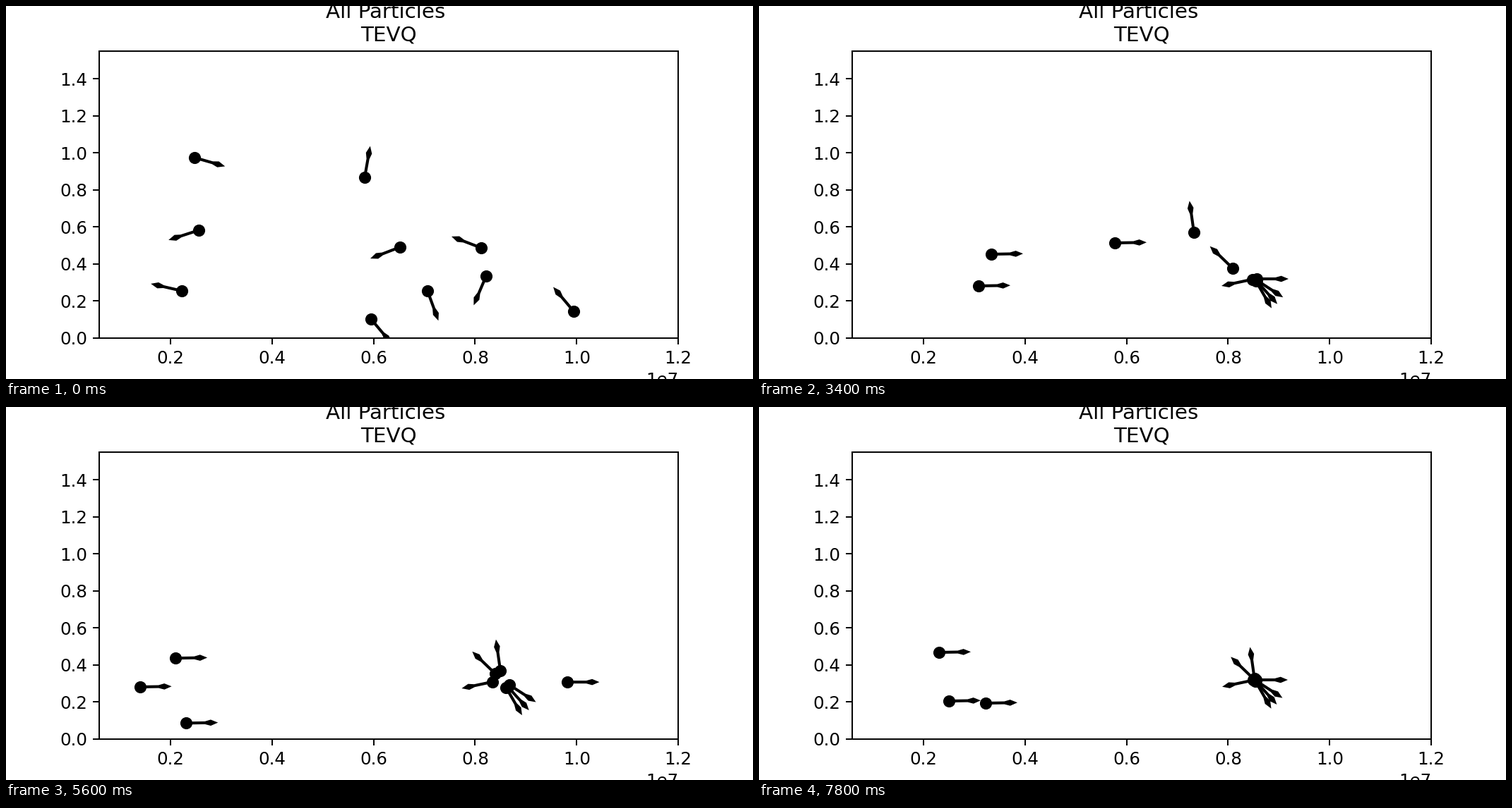
A matplotlib script for the animation above (8 s loop, 1058 by 529 pixels).

```python
import numpy as np
import matplotlib.pyplot as plt
from matplotlib.animation import FuncAnimation

WIDTH, HEIGHT = 1058, 529
STEPS, STEP_MS = 40, 200
ARROW = 45             # arrow length in pixels
HUB = (702, 387)       # where the swarm gathers
LAUNCHES = (0, 11)     # steps at which the swarm is spread out
LANDINGS = {6: 15, 17: 3, 23: 24, 32: 4, 39: 2}  # step: overshoot past the hub


def particle(first, second, heading=0, stops={}, recoil=0):
    """Motion from two launch poses (x, y, heading) to the hub or its own stops."""
    poses = dict(zip(LAUNCHES, (first, second)))
    a = np.radians(heading)
    for step, over in LANDINGS.items():
        past_hub = HUB[0] + over * np.cos(a), HUB[1] - over * np.sin(a)
        poses[step] = (*stops.get(step, past_hub), heading)
    steps = sorted(poses)
    x, y, turn = np.array([poses[s] for s in steps], float).T
    turn = np.unwrap(turn, period=360)

    def at(t):
        leg = np.interp(t, steps, range(len(steps)))
        px, py, angle = (np.interp(t, steps, v) for v in (x, y, turn))
        return px - recoil * abs(np.sin(np.pi * leg)), py, angle

    return at


def straggler(first, second, *stops):
    """A particle that never reaches the hub and swings left between stops."""
    return particle(first, second, 1, dict(zip(LANDINGS, stops)), recoil=90)


swarm = [
    straggler((267, 215, -16), (299, 221, -27),
              (339, 376), (329, 352), (321, 374), (335, 342), (255, 348)),
    straggler((273, 318, 198), (441, 334, -15),
              (323, 380), (504, 336), (315, 460), (367, 439), (321, 420)),
    straggler((249, 404, 167), (352, 383, 29),
              (357, 420), (311, 397), (251, 397), (300, 397), (269, 417)),
    particle((508, 243, 80), (531, 246, -20), 98, {6: (668, 371), 17: (616, 321)}),
    particle((517, 444, -50), (573, 415, 55), -33, {6: (400, 376)}),
    particle((804, 433, 130), (746, 398, 120), 0, {23: (796, 394), 32: (795, 387)}),
    particle((558, 342, 201), (551, 346, 239), 192),
    particle((597, 404, -70), (604, 405, -22), -48),
    particle((673, 343, 159), (659, 341, 159), 136, {17: (671, 372)}),
    particle((680, 383, 247), (675, 376, 103), -60),
]

fig, ax = plt.subplots(figsize=(6, 3), dpi=WIDTH / 6)
fig.subplots_adjust(top=0.8795)
ax.set_title("All Particles \nTEVQ")
ax.set_xlim(0.06e7, 1.2e7)
ax.set_ylim(0, 1.55)


def pose(t):
    """Positions in data units and arrow vectors in pixels."""
    x, y, heading = np.array([p(t) for p in swarm]).T
    pixels = np.column_stack([x, HEIGHT - y])
    a = np.radians(heading)
    return ax.transData.inverted().transform(pixels), ARROW * np.cos(a), ARROW * np.sin(a)


pos, u, v = pose(0)
dots, = ax.plot(*pos.T, "ko")
arrows = ax.quiver(*pos.T, u, v, color="k", units="dots", scale_units="dots", scale=1,
                   width=4.1, headwidth=2.1, headlength=2.5, headaxislength=4.5)


def draw(t):
    pos, u, v = pose(t)
    dots.set_data(*pos.T)
    arrows.set_offsets(pos)
    arrows.set_UVC(u, v)
    return dots, arrows


anim = FuncAnimation(fig, draw, frames=STEPS, interval=STEP_MS, repeat=True, repeat_delay=0)
plt.show()
```
